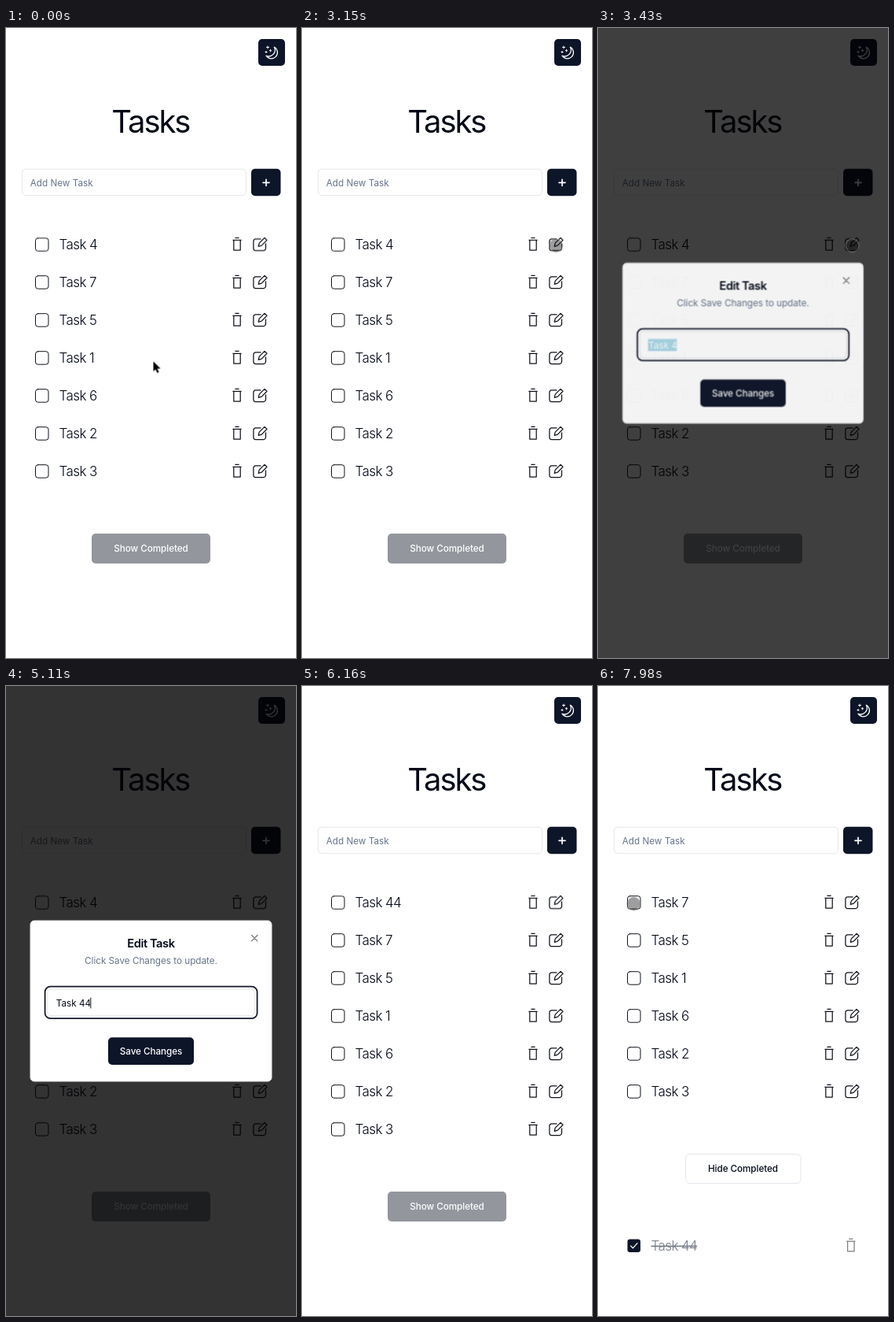
These frames come from a looping animation (369x800 px, 8 s). An HTML page:

```html
<!DOCTYPE html>
<html lang="en">
<head>
<meta charset="utf-8">
<title>Tasks</title>
<style>
  html, body { margin: 0; width: 100%; height: 100%; overflow: hidden; background: #fff; }
  svg { display: block; width: 369px; height: 800px; }
  text { font: 400 11.7px Inter, sans-serif; font-optical-sizing: none; fill: #020817; white-space: pre; }
  .mid { text-anchor: middle; }
  .title { font-size: 40px; letter-spacing: -.052em; }
  .task { font-size: 17px; font-weight: 300; letter-spacing: -.035em; }
  .label { font-weight: 500; letter-spacing: -.005em; }
  .heading { font-size: 14.7px; font-weight: 600; letter-spacing: -.03em; }
  .muted { fill: #64748b; }
  .light { fill: #fff; }
  .navy { fill: #0d1529; }
  .line { fill: none; stroke: #10131c; stroke-width: 1.25; stroke-linecap: round; stroke-linejoin: round; }
  .line.inv { stroke: #fff; }
  .box { fill: #fff; stroke: #e4e7ed; }

  .overlay, .dialog, .arrow, .touch { animation: 8s linear infinite; }
  .overlay { animation-name: overlay; }
  .dialog { animation-name: dialog; transform-origin: 184.5px 400px; }
  .arrow { animation-name: arrow; }
  .touch { animation-name: touch; }

  /* hard switches between states */
  .unsaved, .saved, .todo, .done, .selected, .deselected, .typed, .arrow-on, .touch-on {
    animation: 8s step-end infinite;
  }
  .unsaved { animation-name: unsaved; }
  .saved { animation-name: saved; }
  .todo { animation-name: todo; }
  .done { animation-name: done; }
  .selected { animation-name: selected; }
  .deselected { animation-name: deselected; }
  .typed { animation-name: typed; }
  .arrow-on { animation-name: arrow-on; }
  .touch-on { animation-name: touch-on; }

  @keyframes unsaved { 0% { opacity: 1 } 67.79%, to { opacity: 0 } }
  @keyframes saved { 0% { opacity: 0 } 67.79%, to { opacity: 1 } }
  @keyframes todo { 0% { opacity: 1 } 97.99%, to { opacity: 0 } }
  @keyframes done { 0% { opacity: 0 } 97.99%, to { opacity: 1 } }
  @keyframes selected { 0% { opacity: 1 } 51.62%, to { opacity: 0 } }
  @keyframes deselected { 0% { opacity: 0 } 51.62% { opacity: 1 } 54.24%, to { opacity: 0 } }
  @keyframes typed { 0% { opacity: 0 } 54.24%, to { opacity: 1 } }
  @keyframes arrow-on { 0% { opacity: 1 } 33.74%, to { opacity: 0 } }
  @keyframes touch-on {
    0% { opacity: 0 } 33.74% { opacity: 1 } 51.62% { opacity: 0 } 84.8%, to { opacity: 1 }
  }

  @keyframes overlay {
    0% { opacity: 0 }
    41.14% { opacity: 0; animation-timing-function: ease }
    43.64% { opacity: .8 }
    67.79% { opacity: .8; animation-timing-function: ease }
    70.29%, to { opacity: 0 }
  }
  @keyframes dialog {
    0% { opacity: 0; transform: translate(0, 4px) scale(.95) }
    41.14% { opacity: 0; transform: translate(0, 4px) scale(.95); animation-timing-function: ease }
    43.64% { opacity: 1; transform: translate(0, 0) scale(1) }
    67.79% { opacity: 1; transform: translate(0, 0) scale(1); animation-timing-function: ease }
    70.29%, to { opacity: 0; transform: translate(0, 4px) scale(.95) }
  }
  @keyframes arrow {
    0% { transform: translate(187.5px, 423.5px) }
    12.25% { transform: translate(187.5px, 423.5px); animation-timing-function: ease-in-out }
    17.5% { transform: translate(345px, 300px) }
    20.12% { transform: translate(345px, 300px); animation-timing-function: ease-out }
    21.88% { transform: translate(356px, 288px) }
    23.6% { transform: translate(357.5px, 287px) }
    30% { transform: translate(358px, 286px); animation-timing-function: ease-in }
    33.75%, to { transform: translate(332px, 273px) }
  }
  @keyframes touch {
    0%, 33.75% { transform: translate(332px, 274px); animation-timing-function: ease-out }
    36.75% { transform: translate(322.5px, 276px) }
    42%, 84.8% { transform: translate(323.5px, 276.3px); animation-timing-function: ease-out }
    87.5% { transform: translate(265.5px, 264.5px) }
    90.1% { transform: translate(265.5px, 264.5px); animation-timing-function: ease-in-out }
    93.63%, to { transform: translate(45.5px, 276.5px) }
  }
</style>
</head>
<body>
<svg viewBox="0 0 369 800">
  <defs>
    <g id="trash" class="line">
      <path d="M-5.6-5.3H5.6M-2.6-8.4H2.6M-4.2-5.3V7.3H4.2V-5.3" stroke-linecap="butt"/>
    </g>
    <g id="edit" class="line">
      <path d="M1-6.8H-5.3a2.8 2.8 0 0 0-2.8 2.8V5a2.8 2.8 0 0 0 2.8 2.8H4.7A2.8 2.8 0 0 0 7.5 5V-.8"/>
      <path d="M-1.8 2.6L-.8-1.6 6-8.3 9-5.4 2.3 1.4Z"/>
    </g>
    <rect id="check" x="37.5" y="-8" width="16.5" height="16.5" rx="3.2"/>
  </defs>

  <rect class="navy" x="321" y="14" width="34" height="34" rx="5"/>
  <path class="line inv" stroke-width="1.1"
    d="M341.3 24.2A7.8 7.8 0 1 1 331 35.2A8 8 0 0 0 341.3 24.2Z"/>
  <path class="line inv" style="stroke-width:1"
    d="M333 23v3M331.5 24.5h3M331 29.5v2M330 30.5h2M336.5 27.5v2.4M335.3 28.7h2.4"/>

  <text class="title mid" x="183.8" y="132.5">Tasks</text>

  <rect class="box" x="20.5" y="179.2" width="285" height="33.5" rx="5"/>
  <text class="muted" x="30.8" y="201">Add New Task</text>
  <rect class="navy" x="312" y="178.8" width="37.5" height="34.4" rx="5"/>
  <path class="line inv" style="stroke-width:1.7" d="M327 196.3h8M331 192.3v8"/>

  <g class="todo">
    <g id="before"></g>
    <rect x="109" y="642" width="151" height="38" rx="5" fill="#93969d"/>
    <text class="label light mid" x="184.5" y="665">Show Completed</text>
  </g>

  <g class="done">
    <g id="after"></g>
    <rect class="box" x="111.5" y="594.5" width="146.5" height="37" rx="5"/>
    <text class="label mid" x="184.5" y="617">Hide Completed</text>
    <g transform="translate(0 710.5)">
      <use href="#check" class="navy"/>
      <path class="line inv" d="M41.5.4l2.9 2.9 5.6-6.1"/>
      <text class="task" x="67.5" y="6.2" style="fill:#777d88;text-decoration:line-through">Task 44</text>
      <use href="#trash" x="321.8" opacity=".55"/>
    </g>
  </g>

  <rect class="overlay" width="369" height="800"/>

  <g class="dialog">
    <rect class="box" x="31" y="298" width="307" height="204" rx="5"/>
    <text class="heading mid" x="184.5" y="332.3">Edit Task</text>
    <text class="muted mid" x="184.5" y="353">Click Save Changes to update.</text>
    <path class="line" style="stroke:#70747c" d="M312.5 316.5l7.4 7.4m0-7.4l-7.4 7.4"/>
    <rect x="49.6" y="381.6" width="270" height="40.6" rx="7" fill="#fff" stroke="#14192a" stroke-width="1.8"/>
    <rect class="box" x="52.8" y="384.9" width="263.6" height="34" rx="5"/>
    <g class="selected">
      <rect x="63.3" y="394.6" width="36.7" height="15.4" fill="#a9d8e8"/>
      <text class="light" x="63.8" y="406.8">Task 4</text>
    </g>
    <g class="deselected">
      <text x="63.8" y="406.8">Task 4</text>
      <path class="line" style="stroke-width:1" d="M100.5 396v13"/>
    </g>
    <g class="typed">
      <text x="63.8" y="406.8">Task 44</text>
      <path class="line" style="stroke-width:1" d="M107.8 396v13"/>
    </g>
    <rect class="navy" x="130" y="446.3" width="109" height="34.6" rx="5"/>
    <text class="label light mid" x="184.5" y="467.8">Save Changes</text>
  </g>

  <g class="arrow-on"><g class="arrow">
    <path d="M0 0V12.6L2.9 9.9 4.9 14.6 7.1 13.6 5.1 9.1H9.1Z" stroke="#fff" stroke-width="1.4" paint-order="stroke"/>
  </g></g>
  <g class="touch-on"><g class="touch">
    <circle r="8.3" fill="#000" fill-opacity=".38" stroke="#999" stroke-opacity=".75"/>
  </g></g>
</svg>
<script>
  const row = (label, i) => `
    <g transform="translate(0 ${274.7 + 48 * i})">
      <use href="#check" class="line" style="stroke-width:1"/>
      ${label}
      <use href="#trash" x="294"/><use href="#edit" x="323"/>
    </g>`;
  const task = (n, cls = '') => `<g class="${cls}"><text class="task" x="67.5" y="6.2">Task ${n}</text></g>`;
  const fill = (id, labels) => document.getElementById(id).innerHTML = labels.map(row).join('');

  const rest = [7, 5, 1, 6, 2, 3].map(n => task(n));
  fill('before', [task(4, 'unsaved') + task(44, 'saved'), ...rest]);
  fill('after', rest);
</script>
</body>
</html>
```
